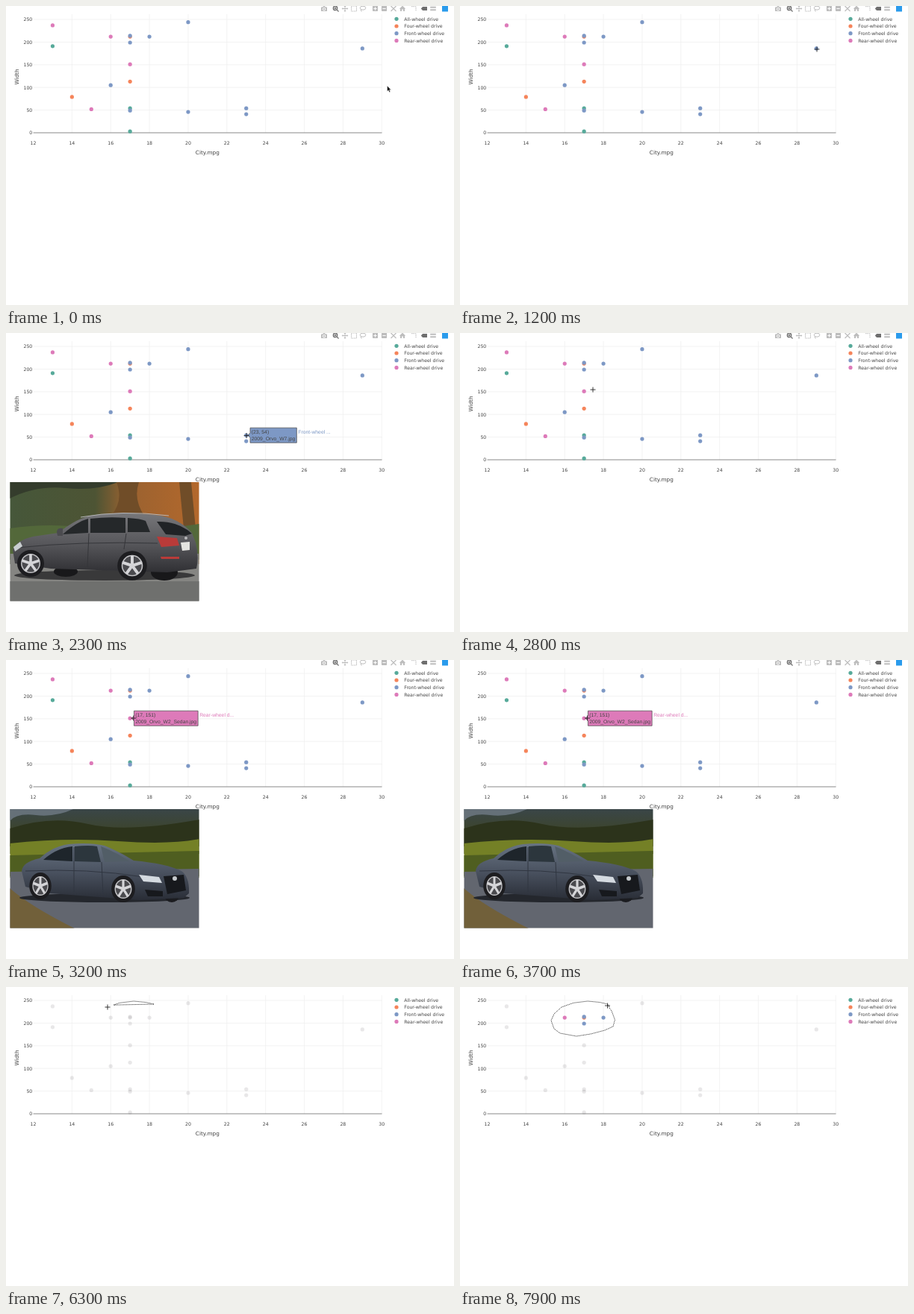
An HTML page that plays this animation: 600 px wide and 401 px high, repeating every 8000 ms.

```html
<!DOCTYPE html>
<html lang="en">
<head>
<meta charset="utf-8">
<title>Scatter plot with lasso</title>
<style>
  html, body { margin: 0; width: 100%; height: 100%; overflow: hidden; background: #fff; }
  svg { display: block; width: 600px; height: 401px; }
  text { font: 6.2px "DejaVu Sans", Verdana, sans-serif; fill: #444; text-rendering: geometricPrecision; }
  .title { font-size: 7.3px; }
  .hover text { font: 6.8px "Liberation Sans", Arial, sans-serif; }
  .icon { fill: none; stroke: currentColor; stroke-width: 1; color: #bdbdbd; }
  .icon.on { color: #6e6e6e; }
  .solid { fill: currentColor; stroke: none; }
  .cut { stroke: #fff; }
</style>
</head>
<body>
<svg id="stage" viewBox="0 0 600 401">
  <defs>
    <clipPath id="frame"><rect x="5.5" y="200" width="253" height="159.5"/></clipPath>
    <clipPath id="tall"><rect x="5.5" y="200" width="253" height="169"/></clipPath>
    <linearGradient id="trees">
      <stop offset="0" stop-color="#46573a"/><stop offset=".45" stop-color="#4d5434"/>
      <stop offset=".62" stop-color="#9a6230"/><stop offset="1" stop-color="#b3682c"/>
    </linearGradient>
    <linearGradient id="woods" x2="0" y2="1">
      <stop offset="0" stop-color="#3a4648"/><stop offset=".6" stop-color="#3d4426"/><stop offset="1" stop-color="#33401c"/>
    </linearGradient>
    <linearGradient id="paint" x2="0" y2="1">
      <stop offset="0" stop-color="#77777a"/><stop offset=".5" stop-color="#58585c"/><stop offset="1" stop-color="#303034"/>
    </linearGradient>
    <linearGradient id="slate" x2="0" y2="1">
      <stop offset="0" stop-color="#687483"/><stop offset=".5" stop-color="#4a5260"/><stop offset="1" stop-color="#292d36"/>
    </linearGradient>
    <g id="wheel">
      <circle r="18" fill="#1d1d20"/><circle r="13" fill="#c3c3c6"/><circle r="11.5" fill="#4a4a4e"/>
      <path d="M0 0V-12M0 0L11.4-3.7M0 0L7 9.7M0 0L-7 9.7M0 0L-11.4-3.7" stroke="#d5d5d8" stroke-width="3.6"/>
    </g>
    <g id="sedan">
      <ellipse cx="132" cy="319" rx="114" ry="6" fill="#24272d"/>
      <ellipse cx="222" cy="316" rx="10" ry="9" fill="#1b1c20"/>
      <path fill="url(#slate)" d="M21 283Q22 271 45 266Q62 250 84 247Q112 244 132 249Q152 257 171 269Q215 273 235 283Q246 291 245 313L238 319L178 322L60 313L26 304Z"/>
      <path fill="#1e252b" d="M50 268Q68 252 89 250V270Z"/>
      <path fill="#2c363d" d="M92 250Q112 248 122 250L127 271L92 270Z"/>
      <path fill="#525e67" d="M127 250Q146 257 166 270L132 271Z"/>
      <path fill="none" stroke="#303641" d="M91 251V311M128 271L130 315M26 283Q110 279 184 291"/>
      <path fill="#d4dae0" d="M178 288L205 291L209 299L184 297Z"/>
      <path fill="#17191d" d="M211 290L238 288L241 309L216 314Z"/>
      <circle cx="226" cy="293" r="3" fill="#c4c8cc"/>
      <path fill="#17191d" d="M186 308L210 310V317L190 317Z"/>
      <use href="#wheel" transform="translate(46 303) scale(.82 1)"/>
      <use href="#wheel" transform="translate(157 307) scale(.88 1)"/>
    </g>
  </defs>
  <g id="plot"></g>
  <g id="bar"></g>

  <g id="photo0" clip-path="url(#tall)">
    <path fill="#9fb0bb" d="M5 200H259V262H5Z"/>
    <path fill="#65745c" d="M5 238Q70 222 130 238T259 234V285H5Z"/>
    <path fill="#8b8c8d" d="M5 280H259V370H5Z"/>
    <use href="#sedan" y="8"/>
  </g>

  <g id="photo1" clip-path="url(#frame)">
    <path fill="url(#trees)" d="M5 200H259V310H5Z"/>
    <path fill="#343c2c" d="M5 200H150Q120 212 80 208T5 222Z"/>
    <path fill="#704d28" d="M148 200H178Q170 224 186 246H140Q158 226 148 200ZM232 200H248L254 262H238Z"/>
    <path fill="#53683a" d="M5 262Q60 254 110 262T259 256V304H5Z"/>
    <path fill="#858582" d="M5 296H259V360H5Z"/>
    <path fill="#6f706e" d="M5 333H259V360H5Z"/>
    <ellipse cx="132" cy="325" rx="121" ry="7" fill="#39393a"/>
    <ellipse cx="80" cy="320" rx="16" ry="7" fill="#18181a"/>
    <ellipse cx="212" cy="321" rx="18" ry="11" fill="#18181a"/>
    <path fill="url(#paint)" d="M9 291Q14 278 36 273L70 268Q94 249 113 245Q155 238 207 245Q232 249 249 268L254 281Q259 300 255 316L216 321L60 316L12 309Z"/>
    <path fill="#25282a" d="M76 270Q95 253 110 249V268ZM113 249Q138 246 160 248V268L113 268ZM163 248Q181 249 187 252L193 267H163Z"/>
    <path fill="#202326" d="M202 253Q230 252 249 269L240 272L214 270Z"/>
    <path fill="none" stroke="#b6b6b8" d="M100 247Q155 237 218 245"/>
    <path fill="none" stroke="#35363a" d="M111 269L109 314M161 269L158 290M14 288Q100 279 203 282"/>
    <path fill="#b93b39" d="M202 273L229 275L232 285L208 287Z"/>
    <path fill="#e4e4e0" d="M234 281L246 280V291L236 292Z"/>
    <circle cx="241" cy="275" r="2" fill="#b8b8ba"/>
    <path fill="#b93b39" d="M207 300L232 300V303H208Z"/>
    <path fill="#c9ced0" d="M10 287L19 280L22 286L12 293Z"/>
    <path fill="#4b4b4f" d="M68 267Q68 261 76 262V272H69Z"/>
    <use href="#wheel" transform="translate(33 309)"/>
    <use href="#wheel" transform="translate(169 312) scale(1.1)"/>
  </g>

  <g id="photo2" clip-path="url(#frame)">
    <path fill="url(#woods)" d="M5 200H259V260H5Z"/>
    <path fill="#657078" d="M5 200H90Q66 211 40 208T5 216Z"/>
    <path fill="#2c331b" d="M5 226Q60 208 110 220T259 214V250H5Z"/>
    <path fill="#748026" d="M5 246Q80 238 150 243T259 240V292H5Z"/>
    <path fill="#4f5e20" d="M5 262L259 256V290H5Z"/>
    <path fill="#62666f" d="M5 284L259 280V360H5Z"/>
    <path fill="#71603a" d="M5 306Q32 330 92 360H5Z"/>
    <use href="#sedan"/>
  </g>

  <g id="labels"></g>
  <path id="lasso" fill="none" stroke="#222" stroke-width="1" stroke-dasharray="1 1"/>
  <path id="cross" d="M-3.5 0H3.5M0-3.5V3.5" stroke="#222" stroke-width=".9"/>
  <path id="arrow" d="M0 0V7.4L1.7 5.9L2.9 8.7L4.2 8.1L3 5.4H5.2Z" fill="#111" stroke="#fff" stroke-width=".4"/>
</svg>
<script>
const LOOP = 8000, STEP = 100;
const $ = id => document.getElementById(id);
const px = v => 36.5 + (v - 12) * 25.93;
const py = v => 170 - v * 0.608;

function add(parent, tag, attrs, text) {
  const el = document.createElementNS("http://www.w3.org/2000/svg", tag);
  for (const k in attrs) el.setAttribute(k, attrs[k]);
  if (text !== undefined) el.textContent = text;
  parent.appendChild(el);
  return el;
}
const show = (el, on) => { el.style.display = on ? "" : "none"; };

const traces = [
  { name: "All-wheel drive", color: "#57aa9a", data: [[13, 191], [17, 54], [17, 3]] },
  { name: "Four-wheel drive", color: "#f5845a", data: [[14, 79], [17, 113], [17, 212]] },
  { name: "Front-wheel drive", color: "#7d98c5", data: [[16, 105], [17, 214], [17, 199], [17, 49], [18, 212],
    [20, 244], [20, 46], [23, 54], [23, 41], [29, 186]] },
  { name: "Rear-wheel drive", color: "#dd7ab9", data: [[13, 237], [15, 52], [16, 212], [17, 151]] }
];

// Axes, markers and legend
const plot = $("plot"), marks = [];
for (let v = 12; v <= 30; v += 2) {
  if (v > 12) add(plot, "path", { d: `M${px(v)} 11V170`, stroke: "#eee", "stroke-width": 0.7 });
  add(plot, "text", { x: px(v), y: 186.3, "text-anchor": "middle" }, v);
}
for (let v = 0; v <= 250; v += 50) {
  add(plot, "path", { d: `M36.5 ${py(v)}H503.5`, stroke: v ? "#eee" : "#888", "stroke-width": v ? 0.7 : 1 });
  add(plot, "text", { x: 35.3, y: py(v) + 2.3, "text-anchor": "end" }, v);
}
add(plot, "text", { class: "title", x: 269.8, y: 198.6, "text-anchor": "middle" }, "City.mpg");
add(plot, "text", { class: "title", transform: "translate(16.8 95) rotate(-90)", "text-anchor": "middle" }, "Width");
traces.forEach((tr, i) => {
  for (const [a, b] of tr.data) {
    const x = px(a), y = py(b);
    marks.push({ x, y, color: tr.color, el: add(plot, "circle", { cx: x, cy: y, r: 2.6 }) });
  }
  const y = 17.3 + i * 9.7;
  add(plot, "circle", { cx: 523, cy: y, r: 2.6, fill: tr.color });
  add(plot, "text", { x: 533.3, y: y + 2.3 }, tr.name);
});

// Toolbar
const bar = $("bar");
const square = '<rect class="solid" x="-3.6" y="-3.6" width="7.2" height="7.2" rx="1"/>';
const icons = [
  [426, '<path class="solid" d="M-4-2H-2L-1-3.3H1L2-2H4V3.5H-4Z"/><circle class="cut" cy=".7" r="1.7"/>'],
  [441.5, '<circle cx="-.5" cy="-.6" r="2.7" stroke-width="1.3"/><path d="M1.5 1.4L4 4M-2-.6H1M-.5-2.1V.9" stroke-width="1.3"/>'],
  [454, '<path d="M-3.5 0H3.5M0-3.5V3.5"/><path class="solid" d="M-4.4 0L-2.6-1.6V1.6ZM4.4 0L2.6-1.6V1.6ZM0-4.4L-1.6-2.6H1.6ZM0 4.4L-1.6 2.6H1.6Z"/>'],
  [466, '<rect x="-3.5" y="-3.5" width="7" height="7" stroke-dasharray="1.5 .8"/>'],
  [478, '<ellipse cy="-.8" rx="3.8" ry="2.5"/><path d="M-2.4 1Q-3.4 2.4-1.6 4"/>'],
  [494.5, square + '<path class="cut" d="M-2.2 0H2.2M0-2.2V2.2"/>'],
  [506.5, square + '<path class="cut" d="M-2.2 0H2.2"/>'],
  [519, '<path d="M-3.5-3.5L3.5 3.5M3.5-3.5L-3.5 3.5" stroke-width="1.2"/>'],
  [531, '<path class="solid" d="M-4.2 .3L0-3.8L4.2 .3H3V3.6H1V1H-1V3.6H-3V.3Z"/>'],
  [546, '<path d="M-3-2.8H3V3.5" stroke-dasharray="1.6 .9"/>'],
  [560, '<path class="solid" d="M-4.2 0L-2-2.4H4V2.4H-2Z"/>', true],
  [572, '<path d="M-3.8-1.8H3.8M-3.8 1.8H3.8" stroke-width="2"/>']
].map(([x, shape, on]) => {
  const g = add(bar, "g", { class: on ? "icon on" : "icon", transform: `translate(${x} 3.5)` });
  g.innerHTML = shape;
  return g;
});
const zoomIcon = icons[1], lassoIcon = icons[4];
add(bar, "rect", { x: 584, y: 0, width: 8, height: 7.5, fill: "#2a9bec" });

// Hover labels with their photos
const hovers = [
  { from: 400, to: 1200, at: [29, 186], trace: 2, file: "2009_Orvo_L3_Wagon.jpg", tag: "Front-wheel ..." },
  { from: 1700, to: 2400, at: [23, 54], trace: 2, file: "2009_Orvo_W7.jpg", tag: "Front-wheel ..." },
  { from: 3100, to: 4200, at: [17, 151], trace: 3, file: "2009_Orvo_W2_Sedan.jpg", tag: "Rear-wheel d..." }
];
hovers.forEach((h, i) => {
  const { color } = traces[h.trace], [a, b] = h.at;
  h.photo = $("photo" + i);
  h.label = add($("labels"), "g", { class: "hover", transform: `translate(${px(a)} ${py(b)})` });
  const box = add(h.label, "path", { fill: color, stroke: "#444", "stroke-width": 0.7 });
  add(h.label, "text", { x: 7, y: -1.8 }, `(${a}, ${b})`);
  const file = add(h.label, "text", { x: 7, y: 6.9 }, h.file);
  const right = 9 + file.getComputedTextLength();
  box.setAttribute("d", `M2 0L5.3-3V-10H${right}V10H5.3V3Z`);
  add(h.label, "text", { x: right + 2, y: -1.8, style: `fill:${color}` }, h.tag);
});

// Pointer and lasso path: [time, x, y]
const LASSO_START = 5800, LAG = 60;
const loopPath = [
  [5800, 198, 23], [5930, 187, 20.5], [6060, 171, 19], [6180, 152, 21.3], [6300, 136, 27],
  [6420, 126, 36], [6560, 122, 45], [6700, 126, 56], [6820, 134, 62], [7050, 156, 66],
  [7230, 175, 63], [7420, 194, 58], [7540, 205, 53], [7660, 207.5, 44], [7800, 203, 32], [7900, 197.5, 25]
];
const path = [
  [0, 510.5, 107], [400, 480, 60], [1200, 478, 58], [1700, 322.5, 138], [2400, 322, 137.5],
  [2800, 178, 76], [3100, 171, 78], [4200, 170, 78], [4600, 478, 9], [4800, 478, 4], [5000, 478, 4],
  [5200, 330, 110], [5400, 190, 90], [5650, 198, 24], ...loopPath
];

function along(list, t) {
  const i = list.findIndex(k => k[0] > t);
  if (i < 0) return list[list.length - 1].slice(1);
  const [t0, x0, y0] = list[i - 1], [t1, x1, y1] = list[i];
  const f = (t - t0) / (t1 - t0);
  return [x0 + (x1 - x0) * f, y0 + (y1 - y0) * f];
}

function inside(poly, x, y) {
  let hit = false;
  poly.forEach(([x1, y1], i) => {
    const [x2, y2] = poly[(i + 1) % poly.length];
    if ((y1 > y) !== (y2 > y) && x < x1 + (x2 - x1) * (y - y1) / (y2 - y1)) hit = !hit;
  });
  return hit;
}

function draw(t) {
  const [x, y] = along(path, t);
  const inPlot = x < 503.5 && y > 11;
  for (const [id, on] of [["cross", inPlot], ["arrow", !inPlot]]) {
    show($(id), on);
    $(id).setAttribute("transform", `translate(${x} ${y})`);
  }

  for (const h of hovers) {
    const on = t >= h.from && t < h.to;
    show(h.photo, on);
    show(h.label, on);
  }

  const picked = t >= 4900, dragging = t > LASSO_START;
  zoomIcon.classList.toggle("on", !picked);
  lassoIcon.classList.toggle("on", picked);
  show(bar, !dragging);

  let poly = [];
  if (dragging) {
    const end = t - LAG;
    poly = loopPath.filter(k => k[0] < end).map(k => k.slice(1));
    poly.push(along(loopPath, end));
  }
  show($("lasso"), dragging);
  if (dragging) $("lasso").setAttribute("d", "M" + poly.map(p => p.join(" ")).join("L") + "Z");
  for (const m of marks) {
    const dim = dragging && !inside(poly, m.x, m.y);
    m.el.setAttribute("fill", dim ? "#5a525a" : m.color);
    m.el.setAttribute("fill-opacity", dim ? 0.14 : 1);
  }
}

const start = performance.now();
let last = -1;
function tick() {
  const t = Math.floor(((performance.now() - start) % LOOP) / STEP) * STEP;
  if (t !== last) draw(last = t);
  requestAnimationFrame(tick);
}
tick();
</script>
</body>
</html>
```
